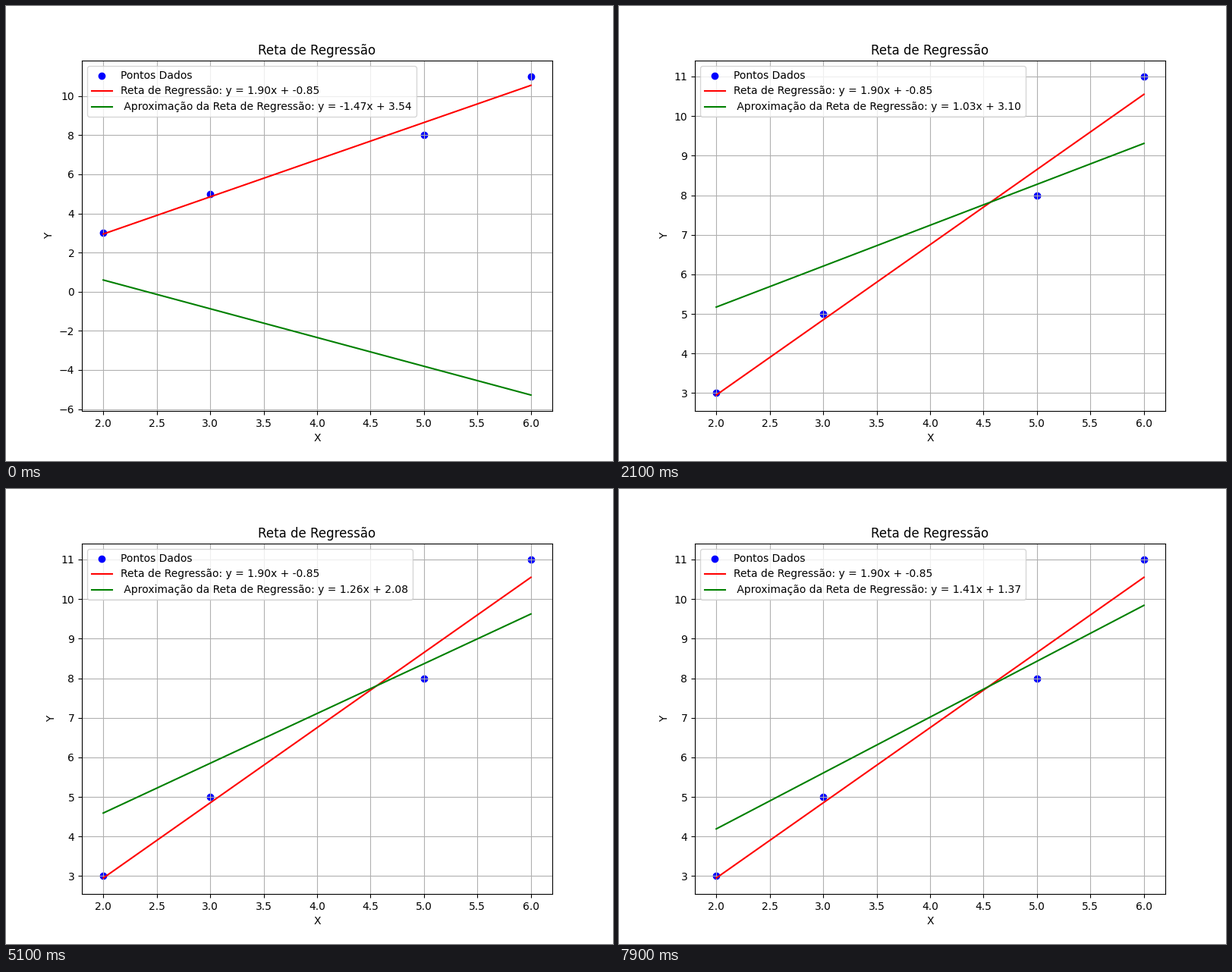
A matplotlib script that plays this animation: 800x600 px, repeating every 8 s.

```python
import numpy as np
import matplotlib.pyplot as plt
from matplotlib.animation import FuncAnimation

FRAMES = 80
RATE = 0.01   # learning rate
H = 0.01      # forward-difference step

x = np.array([2.0, 3.0, 5.0, 6.0])
y = np.array([3.0, 5.0, 8.0, 11.0])
slope, intercept = np.polyfit(x, y, 1)


def loss(a, b):
    return np.sum((a * x + b - y) ** 2)


def descend(a, b, steps):
    """Gradient descent with numerical partial derivatives."""
    path = [(a, b)]
    for _ in range(steps - 1):
        base = loss(a, b)
        grad_a = (loss(a + H, b) - base) / H
        grad_b = (loss(a, b + H) - base) / H
        a, b = a - RATE * grad_a, b - RATE * grad_b
        path.append((a, b))
    return path


path = descend(-1.47, 3.54, FRAMES)

plt.rcParams["font.family"] = "DejaVu Sans"
fig, ax = plt.subplots(figsize=(8, 6), dpi=100)


def plot_line(a, b, color, name):
    ax.plot(x, a * x + b, color=color, label=f"{name}: y = {a:.2f}x + {b:.2f}")


def update(i):
    ax.clear()
    ax.scatter(x, y, color="blue", label="Pontos Dados")
    plot_line(slope, intercept, "red", "Reta de Regressão")
    plot_line(*path[i], "green", " Aproximação da Reta de Regressão")
    ax.set_title("Reta de Regressão")
    ax.set_xlabel("X")
    ax.set_ylabel("Y")
    ax.legend(loc="upper left")
    ax.grid(True)


anim = FuncAnimation(fig, update, frames=FRAMES, init_func=lambda: None,
                     interval=100, repeat=True, repeat_delay=0)
plt.show()
```
